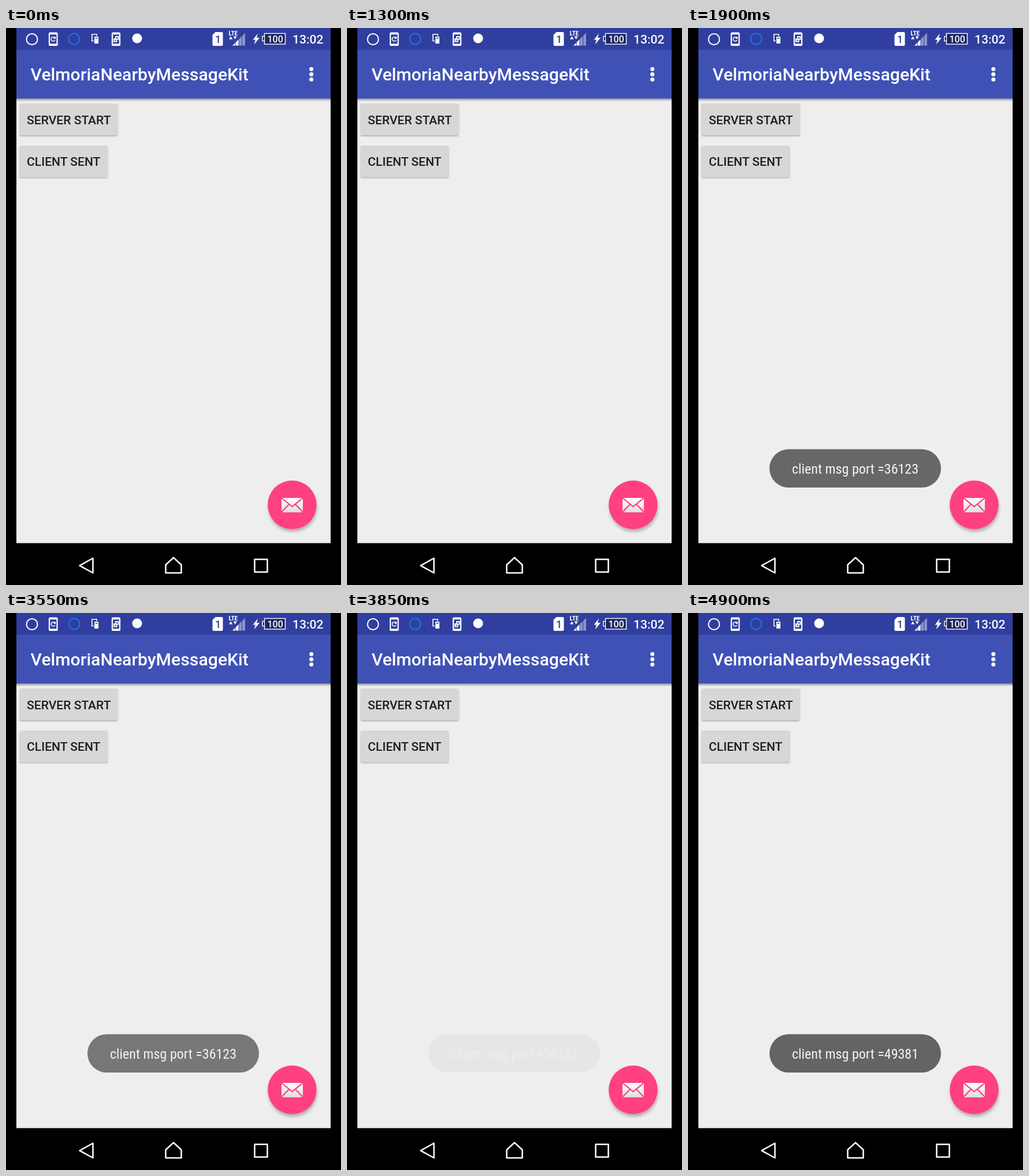
Recreate the animation shown at these times as an HTML page. Size 580x966 px, loop 4950 ms.

```html
<!DOCTYPE html>
<html lang="en">
<head>
<meta charset="utf-8">
<title>Local message demo</title>
<style>
  html, body { margin: 0; width: 100%; height: 100%; overflow: hidden; background: #000; }
  svg { display: block; width: 580px; height: 966px; }
  text { font-family: Roboto, sans-serif; font-weight: 500; }
  .label { font-size: 21.1px; fill: #1e1e1e; }
  .network { font: 700 11px "Roboto Condensed", Roboto, sans-serif; fill: #fff; }
  .toast { opacity: 0; }
  .toast text {
    font: 400 24px "Roboto Condensed", Roboto, sans-serif;
    fill: #f4f4f4;
    text-anchor: middle;
  }
  .line { fill: none; stroke: #fff; }
</style>
</head>
<body>
<svg viewBox="0 0 580 966">
  <defs>
    <filter id="soft" x="-20%" y="-20%" width="140%" height="150%">
      <feDropShadow dx="0" dy="1.5" stdDeviation=".9" flood-opacity=".3"/>
    </filter>
    <filter id="lift" x="-30%" y="-30%" width="160%" height="170%">
      <feDropShadow dx="1" dy="4.5" stdDeviation="2.8" flood-opacity=".26"/>
    </filter>
    <linearGradient id="barShade" x2="0" y2="1">
      <stop stop-color="#000" stop-opacity=".36"/>
      <stop offset="1" stop-color="#000" stop-opacity="0"/>
    </linearGradient>
    <linearGradient id="paper" x2="0" y2="1">
      <stop stop-color="#fff"/>
      <stop offset="1" stop-color="#dedede"/>
    </linearGradient>
  </defs>

  <rect width="580" height="966"/>
  <rect x="18" width="544" height="893.4" fill="#eee"/>
  <rect x="18" width="544" height="38" fill="#303f9f"/>
  <rect x="18" y="37.8" width="544" height="84.6" fill="#3f51b5"/>
  <rect x="18" y="122.4" width="544" height="5" fill="url(#barShade)"/>

  <!-- notification icons -->
  <circle class="line" cx="45" cy="19.5" r="9.5" stroke-width="2"/>
  <g class="line" stroke-width="2.2">
    <rect x="75" y="8.5" width="13.5" height="21.5" rx="1.5"/>
    <path d="M84.6 17A3.6 3.6 0 1 0 85 21M85.3 15v3h-3" stroke-width="1.5"/>
    <path d="M75 10h13.5M75 28.6h13.5" stroke-width="2.6"/>
    <rect x="184" y="8.5" width="13" height="21.5" rx="1.5"/>
    <path d="M184 10h13M184 28.6h13" stroke-width="2.6"/>
  </g>
  <circle cx="118" cy="19" r="9.5" fill="none" stroke="#1976e6" stroke-width="2"/>
  <path class="line" d="M152 22.5h-3.2V11h8.2v3" stroke-width="1.6"/>
  <path d="M153 15h7v12h-7z" fill="#fff"/>
  <path d="M154.5 17h4v1.5h-4z" fill="#303f9f"/>
  <path d="M189 14h6.5v6.5H189zM186 18h6.5v6.5H186z" fill="#fff"/>
  <path d="M191 16h2.5v2.5H191zM188 20.5h2.5v2H188z" fill="#303f9f"/>
  <circle cx="227" cy="18" r="8.5" fill="#fff"/>

  <!-- system icons -->
  <path d="M362.5 7H373.5a2 2 0 0 1 2 2V29a2 2 0 0 1-2 2H359.5a2 2 0 0 1-2-2V12z" fill="#fff"/>
  <text x="362" y="26" font-size="18" fill="#303f9f">1</text>
  <text class="network" x="385.5" y="13">LTE</text>
  <path d="M386 19.5l3.2-5 3.2 5zM393.5 14.5h6.4l-3.2 5z" fill="#fff"/>
  <g id="signal"></g>
  <path d="M436 9.5L427.5 20.5H432L429.5 28.5L439 17H434z" fill="#fff"/>
  <rect x="447.5" y="9.5" width="36" height="18.5" fill="#1d2660" stroke="#fff" stroke-width="1.4"/>
  <path d="M447 14.5h-3v8h3" fill="#1d2660" stroke="#fff" stroke-width="1.4"/>
  <text x="452.5" y="24.5" font-size="16" fill="#fff">100</text>
  <text x="496" y="27" font-size="21.1" fill="#fff">13:02</text>

  <!-- app bar -->
  <text x="42.5" y="91" font-size="30.2" fill="#fff">VelmoriaNearbyMessageKit</text>
  <g fill="#fff">
    <circle cx="528.7" cy="71.3" r="3.5"/>
    <circle cx="528.7" cy="80.3" r="3.5"/>
    <circle cx="528.7" cy="89.3" r="3.5"/>
  </g>

  <!-- buttons -->
  <g filter="url(#soft)" fill="#d7d7d7">
    <rect x="23.5" y="131" width="170" height="55" rx="3"/>
    <rect id="send" x="23.5" y="204" width="152.5" height="54.5" rx="3"/>
  </g>
  <text class="label" x="36" y="167">SERVER START</text>
  <text class="label" x="36" y="239">CLIENT SENT</text>

  <!-- floating button -->
  <circle cx="495.4" cy="827" r="42.3" fill="#ff4081" filter="url(#lift)"/>
  <rect x="477" y="815" width="37" height="25" fill="url(#paper)"/>
  <path d="M477 815L495.5 830L514 815M477 839.5L490 826M514 839.5L501 826"
        fill="none" stroke="#ff4081" stroke-width="2.2"/>

  <g class="toast" id="first">
    <rect x="141" y="730.5" width="297" height="66.5" rx="33.25" fill="#676767"/>
    <text x="289.5" y="773">client msg port =36123</text>
  </g>
  <g class="toast" id="second">
    <rect x="141" y="730.5" width="297" height="66.5" rx="33.25" fill="#646464"/>
    <text x="289.5" y="773">client msg port =49381</text>
  </g>

  <!-- navigation -->
  <g class="line" stroke-width="2.5" stroke-linejoin="round">
    <path d="M127.5 932.3L150.5 919.5V945z"/>
    <path d="M276.5 945V931L290 918.5L303.5 931V945z"/>
    <rect x="430.5" y="921.4" width="22" height="22"/>
  </g>
</svg>
<script>
  const LOOP = 4950, TICK = 50;
  const byId = id => document.getElementById(id);

  // Signal bars grow along a diagonal; the first two are lit.
  byId('signal').innerHTML = [0, 1, 2, 3].map(i => {
    const x = 392 + i * 5.7, top = 30.5 - i * 5.7;
    return `<path d="M${x} 30.5V${top}L${x + 4.8} ${top - 4.8}V30.5z"
      fill="${i < 2 ? '#fff' : '#8c95cb'}"/>`;
  }).join('');

  // Each step is [time, value] and holds until the next one.
  function play(el, prop, steps) {
    const frames = steps.map(([time, value]) =>
      ({ offset: time / LOOP, [prop]: value, easing: 'step-end' }));
    frames.push({ offset: 1, [prop]: steps.at(-1)[1] });
    el.animate(frames, { duration: LOOP, iterations: Infinity }).startTime = 0;
  }

  // Decelerating fade, one step per tick.
  const fadeIn = start => Array.from({ length: 8 }, (_, i) =>
    [start + i * TICK, i < 7 ? 1 - (0.89 - i * 0.1) ** 2 : 1]);

  // Accelerating fade; the last faint step stays until the next toast.
  const fadeOut = [3550, 3650, 3700, 3750, 3800, 3850].map(time =>
    [time, 1 - (0.346 + (time - 3550) / 478) ** 2]);

  play(byId('first'), 'opacity', [[0, 0], ...fadeIn(1450), ...fadeOut, [4000, 0]]);
  play(byId('second'), 'opacity', [[0, 0], ...fadeIn(4000)]);
  play(byId('send'), 'fill', [
    [0, '#d7d7d7'], [1450, '#d3d3d3'], [1800, '#d7d7d7'],
    [4000, '#d3d3d3'], [4350, '#d7d7d7']
  ]);
</script>
</body>
</html>
```
